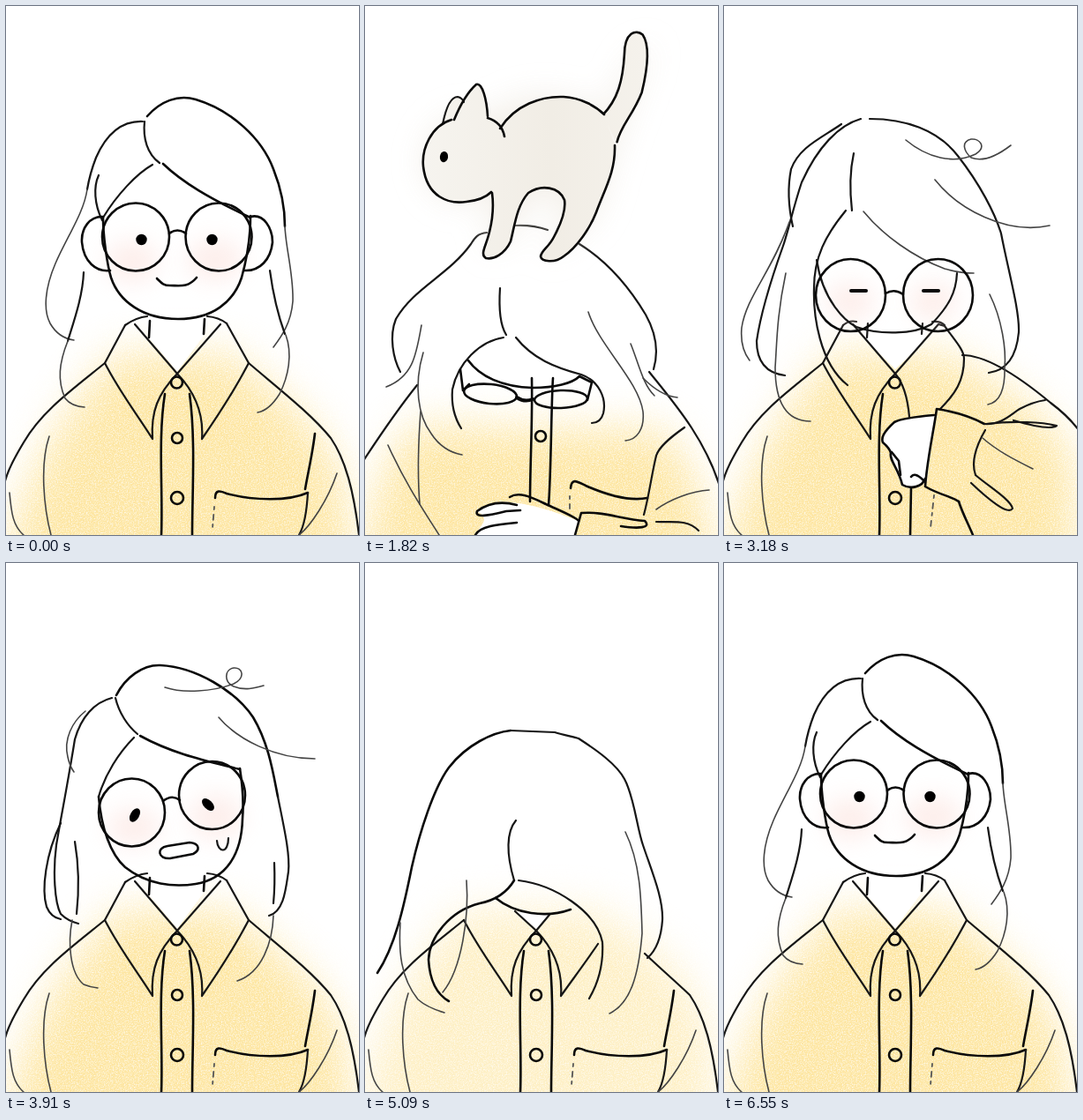
An HTML page that plays this animation: 400x600 px, repeating every 7.36 s.

```html
<!DOCTYPE html>
<html lang="en">
<head>
<meta charset="utf-8">
<title>Cat on the head</title>
<style>
html, body { margin: 0; width: 100%; height: 100%; overflow: hidden; background: #fff; }
svg { display: block; width: 400px; height: 600px; }
path { fill: none; stroke: #0a0a0a; stroke-linecap: round; stroke-linejoin: round; }
.b { stroke-width: 2.6; }
.m { stroke-width: 2.2; stroke: #161616; }
.t { stroke-width: 1.6; stroke: #444; }
.h { stroke-width: 4; }
.f { fill: #000; stroke: none; }
.w { fill: #fff; stroke: none; }
.dash { stroke-width: 1.8; stroke: #555; stroke-dasharray: 3 6 6 5; }
.tint, .pale { fill: #fde293; stroke: none; filter: url(#grain); opacity: .88; }
.pale { opacity: .55; }
.blush { fill: #fbd9d2; stroke: none; opacity: .42; filter: url(#soft); }
.fur { fill: url(#coat); stroke: none; }
.glow { fill: #f1ece4; stroke: none; filter: url(#wide); opacity: .85; }
</style>
</head>
<body>
<svg viewBox="0 0 400 600" id="stage">
  <defs>
    <filter id="grain" filterUnits="userSpaceOnUse" x="0" y="0" width="400" height="600" color-interpolation-filters="sRGB">
      <feGaussianBlur in="SourceGraphic" stdDeviation="24" result="soft"/>
      <feTurbulence type="fractalNoise" baseFrequency=".7" numOctaves="2" seed="4"/>
      <feColorMatrix values="0 0 0 0 0  0 0 0 0 0  0 0 0 0 0  1.7 0 0 0 -.02" result="dots"/>
      <feComposite in="soft" in2="dots" operator="in"/>
    </filter>
    <filter id="soft" x="-60%" y="-60%" width="220%" height="220%"><feGaussianBlur stdDeviation="13"/></filter>
    <filter id="wide" x="-40%" y="-40%" width="180%" height="180%"><feGaussianBlur stdDeviation="18"/></filter>
    <linearGradient id="coat" gradientUnits="userSpaceOnUse" x1="66" y1="0" x2="330" y2="0">
      <stop offset="0" stop-color="#f6f4ef"/><stop offset=".55" stop-color="#f1ede5"/><stop offset="1" stop-color="#f5f2ec"/>
    </linearGradient>
  </defs>
  <g id="body"></g>
  <g id="head"></g>
  <g id="cat">
    <path class="glow" d="M101,115C60,130 50,200 110,210L143,200L140,270L170,240Q195,180 226,210L205,275L262,222L284,143L326,30L305,45L271,111Q200,70 139,113Z"/>
    <g id="tail">
      <path class="fur" d="M271,111C290,95 298,75 303,45C306,20 319,18 326,25C333,38 327,65 318,90C305,115 290,125 284,145Z"/>
      <path class="b" d="M271,111C290,95 298,75 303,45C306,20 319,18 326,25C333,38 327,65 318,90C305,115 290,125 284,143"/>
    </g>
    <path class="fur" d="M88,122C92,102 98,91 105,91L112,97Q118,84 126,77C133,74 138,95 139,113L153,127C170,100 200,90 225,91C245,92 262,102 271,111L283,146C284,175 272,195 262,222C255,240 240,262 225,272C215,280 200,278 199,272C200,265 208,262 214,250C222,235 228,220 226,208C220,193 200,190 185,200C172,215 170,235 165,255C158,270 145,276 137,274C130,270 137,260 140,248C145,230 146,215 144,200C138,204 130,208 115,210C95,213 70,205 66,170C64,150 75,122 88,122Z"/>
    <path class="m" d="M88,122C92,102 98,91 105,91Q110,92 112,97"/>
    <path class="b" d="M98,117C75,124 64,150 66,170C70,205 95,213 115,210Q134,208 143,199M101,117C108,100 117,85 126,77C133,74 138,95 139,113M139,115C149,118 156,125 158,136M153,127C170,100 200,90 225,91C245,92 262,102 271,111"/>
    <path class="b" d="M283,146C284,175 272,195 262,222C255,240 240,262 225,272C215,280 200,278 199,272C200,265 208,262 214,250C222,235 228,220 226,208C220,193 200,190 185,200C172,215 170,235 165,255C158,270 145,276 137,274C130,270 137,260 140,248C145,230 146,215 144,200"/>
    <ellipse cx="89.500" cy="159" rx="4.600" ry="6.200" transform="rotate(8 89 159)"/>
  </g>
</svg>
<script>
const $ = id => document.getElementById(id);
const NS = 'http://www.w3.org/2000/svg';

// "O x y rx ry angle" is shorthand for an ellipse.
function oval(x, y, rx, ry = rx, a = 0) {
  const c = rx * Math.cos(a * Math.PI / 180), s = rx * Math.sin(a * Math.PI / 180);
  return `M${x - c},${y - s}a${rx},${ry} ${a} 1 1 ${2 * c},${2 * s}a${rx},${ry} ${a} 1 1 ${-2 * c},${-2 * s}`;
}

// Each line: name, line class, path. A lone "-" removes an inherited stroke.
function pose(text, base = {}) {
  const out = { ...base };
  for (const line of text.trim().split('\n')) {
    const [name, cls, ...rest] = line.trim().split(' ');
    if (cls === '-') { delete out[name]; continue; }
    const d = rest[0] === 'O' ? oval(...rest.slice(1).map(Number)) : rest.join(' ');
    out[name] = { cls, d };
  }
  return out;
}

const front = pose(`
tint tint M125,395L255,395C290,430 355,465 380,530L402,660L-5,660C10,545 60,465 125,395Z
neck w M163,345L225,345L224,374L194,415L162,376Z
neckL b M163,357L162,376
neckR b M225,355L224,372
backL m M160,352Q148,353 135,362
backR m M228,352Q241,353 250,360
colL m M135,362L112,405C130,440 150,465 166,491C164,460 172,440 194,417L146,361
colR m M250,360L275,405C262,430 240,465 222,491C224,465 216,440 194,417L243,361
placL b M180,440C172,490 178,550 176,600
placR b M208,440C215,490 211,550 211,600
btn1 b O 193.5 427 6.5
btn2 b O 194 490 6
btn3 b O 194 558 7
shL m M112,405C75,435 40,460 20,495C5,520 0,532 -4,550
shR m M275,405C310,435 345,462 368,490C385,515 394,550 400,600
armL t M49,488C38,520 43,570 51,600
cuffL t M4,552C6,575 8,590 20,600
pocket b M237,558C237,548 243,550 250,553C280,561 320,562 342,552
pside m M342,552C341,570 338,590 332,600
stitch dash M236,568L234,592
armR b M350,485C347,510 342,530 339,548
foldR t M375,530C365,560 345,590 332,600`);

const bodies = {
A: front,
B: pose(`
tint tint M55,475L245,480L335,480C365,510 385,540 402,660L-5,660C5,550 20,520 55,475Z
placL b M189,422C190,470 187,520 187,562
placR b M213,422C211,450 211,530 208,566
btn2 b O 199 488 6
shL m M59,430C35,460 15,490 -2,516
shR m M322,415C350,450 385,490 402,545
armL t M63,460C60,500 60,540 62,565
cuffL t M26,498C45,540 65,570 84,600
pocket b M233,547C234,535 240,539 250,544C275,555 300,562 320,558
stitch dash M232,556L232,570
armR m M362,478C345,490 333,500 330,510C325,530 322,555 316,577
foldR t M390,549C370,550 345,560 330,571
palm w M125,602C127,590 145,583 127,573C140,560 170,555 242,584L238,602Z
fing1 b M125,600C130,590 150,588 172,586
fing2 b M172,566C150,560 135,567 127,573C124,581 140,578 160,573L176,572
hand b M164,557C175,550 190,558 205,565C220,572 240,580 242,584
cuff b M238,600L245,575C270,573 290,582 317,584C325,592 310,593 290,590
wrist m M330,585C350,586 365,582 378,595`),
C: pose(`
tint tint M80,440L120,420L205,430L225,505L315,510L360,515L402,660L-5,660C10,540 30,500 80,440Z
neckL m M181,388C190,398 198,402 207,406
neckR m M248,392Q245,402 236,407
backL m M214,411L228,410
colL m M207,413C190,430 175,450 163,466
colR m M232,409C245,435 255,455 270,475
placL b M208,413C202,460 197,510 199,573
placR b M234,412C227,470 227,530 228,583
btn1 b O 221 426 6
btn2 b O 212 510 6
shL m M95,396C65,420 50,445 35,465C15,485 5,500 -2,515
shR m M300,403C330,430 360,455 375,485C390,510 395,530 402,545
armL m M64,445C50,490 38,530 48,565Q54,588 69,600
cuffL t M38,502C32,530 40,560 45,570
pocket m M236,548C238,538 245,540 255,543C280,552 305,556 320,549
stitch dash M237,554L237,576
armR m M349,478C335,490 328,510 325,530C322,555 318,570 317,580
foldR t M390,533C360,538 340,550 320,577
palm w M120,602C125,580 145,572 165,574C190,574 215,578 238,582L238,602Z
hand b M120,600C125,580 145,574 165,574C190,574 215,578 236,582
fing1 b M155,592Q143,592 132,600
cuff m M238,600L240,581C255,582 270,585 282,586L284,600
wrist m M282,585C300,583 320,575 345,574C365,574 375,578 383,585`),
D: pose(`
tint tint M125,395L255,395C300,425 365,455 395,510L402,660L-5,660C10,545 60,465 125,395Z
neck w M150,345L235,345L228,380L194,412L160,378Z
neckL m M163,360L162,376
neckR m M225,360L224,372
backL m M150,358Q142,356 135,362
backR m M236,358Q245,357 250,362
colR m M194,417L243,361L250,363C262,380 272,390 272,400C272,425 262,440 245,457
colR2 m M194,417Q207,432 210,466
placR b M212,546L211,600
btn2 -
pside -
pocket -
armR -
foldR -
stitch dash M238,555L234,592
shR m M270,396C300,396 340,425 370,450Q390,465 402,481
palm w M240,463C215,466 200,468 193,472C180,484 178,490 180,495L189,507C190,518 196,530 202,545C212,547 225,545 230,538Z
hand b M238,464C215,466 200,468 193,472C180,484 178,490 180,495Q188,502 189,507C187,515 198,525 202,543C212,549 225,545 228,536
fing1 b M190,506L198,516L200,532M212,534Q216,528 226,538
cuff b M295,474C280,466 260,460 241,457C238,480 230,515 228,545C245,555 258,556 266,562
elbow b M266,562C270,575 278,590 282,600
cuffR m M296,481C285,500 280,518 285,532
wrist m M295,474C315,475 325,463 335,457Q350,449 364,447
fold1 m M297,474C330,470 360,472 377,476C370,481 345,475 328,470
fold2 t M293,490C310,505 330,515 350,525
fold3 m M285,532C300,545 325,560 327,570C322,578 300,560 280,541`, front),
E: front,
F: pose(`
tint pale M110,395L265,395C320,435 370,460 390,530L402,660L-5,660C0,540 45,470 110,395Z
neck w M170,395L209,399L194,415Z
neckL m M170,395L194,417L209,399
neckR -
backL -
backR -
colL m M112,405C130,440 150,465 166,491C164,460 172,440 194,417
colR m M264,432C252,450 237,470 222,491C224,465 216,440 194,417
shR m M317,443C335,460 352,475 368,490C385,515 394,550 400,600`, front)
};

const smile = pose(`
blush blush O 143 290 30 24
blush2 blush O 237 288 32 24
hairR b M160,125C175,108 195,100 215,106C255,118 290,150 303,185C313,210 316,232 316,250
tipR t M316,250C317,275 326,305 325,335C323,360 312,375 303,387
hairL m M155,131C130,130 113,147 102,172Q95,190 92,208
tipL t M92,208C88,235 70,260 56,292C44,320 42,345 50,360C58,374 70,378 77,379
part m M157,131C155,150 160,168 174,178
bangR b M178,179C200,200 230,218 277,240
bangL m M166,180C148,190 125,215 110,240
wisp m M105,192C99,205 100,225 109,243
earL b M110,239C95,238 85,252 86,268C88,290 102,302 118,300
earR b M277,239C292,235 302,252 302,268C300,287 288,301 270,300
chin b M110,240C110,262 115,295 119,308C128,335 155,355 195,355C235,355 258,335 267,308C272,290 277,262 277,238
lensL b O 147 262 38 38.5
lensR b O 241 262 37.5 38.5
bridge b M185,258Q194,251 204,258
eyeL f O 153.5 265 6.2
eyeR f O 233.5 265 6.2
mouth b M171,309C176,314 178,317 186,317C196,317 206,320 216,308
lockL m M88,302C87,330 76,360 70,380
endL t M70,380C60,405 58,425 67,445Q74,454 89,455
lockR m M299,300C303,330 308,350 316,372
endR t M317,373C325,395 320,420 310,440Q298,459 285,461`);

const shut = pose(`
eyeL b M146,264Q153,270 161,264
eyeR b M226,264Q233,270 241,264`, smile);
const flat = 'mouth b M183,314Q194,311 205,314';

const heads = {
A: smile,
shut,
calm: pose(flat, smile),
grin: pose('mouth b M177,311Q194,321 210,311', smile),
nap: pose(flat, shut),
B: pose(`
hairL m M138,247C128,248 125,252 120,260C95,295 55,310 35,345C27,365 32,390 40,405
crown m M170,239Q190,238 207,244
hairR m M243,260C275,280 300,310 318,340C332,365 332,385 327,402
tipL t M64,352C58,385 55,410 24,422
endL t M66,383C55,420 60,455 75,475Q88,495 110,499
part m M153,310C151,340 155,355 160,363
bangL m M157,366C130,370 105,395 99,425Q97,450 109,469
bangR m M171,366C190,390 215,400 245,408C265,415 274,435 270,452Q267,463 257,463
endR t M253,337C265,375 310,415 315,450C317,470 308,482 295,483
lockR t M301,373C310,395 315,420 328,432
tipR t M315,412C330,427 342,433 354,434
chin b M117,392C130,410 155,422 190,423C215,423 235,418 243,410
lensL b O 142 430 30 11 6
lensR b O 222 436 30 10 -2
bridge h M172,434Q181,440 190,436
frameL b M118,419L111,426L108,402
frameR b M243,410L257,417L252,437`),
C: pose(`
hairL m M219,125C195,125 165,140 145,160C125,180 118,210 105,235C90,270 70,310 72,345Q75,369 89,372
outL t M200,127C165,128 140,135 132,146Q125,156 123,180
tipL t M104,235C80,290 62,340 60,374
hairR m M232,127C260,130 300,150 320,180C340,215 335,250 350,285C365,315 375,345 372,360Q369,377 353,384
tipR t M341,317C338,360 345,410 367,444
part m M221,138C212,160 208,175 208,191
bangL m M201,195C180,205 160,245 142,286C132,330 135,380 137,410C142,435 155,455 163,466
wisp t M124,377C125,420 135,445 162,466
lockL m M115,235C100,300 98,360 97,405Q99,437 119,452
bangR t M220,193C245,210 265,235 280,260C292,285 293,320 291,350C283,400 265,440 235,468
lockR m M303,405C300,440 285,465 270,475
endR t M325,375C325,420 318,465 298,482Q290,490 282,490
curl t M244,152C260,175 290,180 315,172C335,165 335,150 320,150C308,150 305,165 318,172C330,178 345,175 355,166
stray t M265,188C290,220 330,235 373,229
chin m M137,345C150,375 180,397 215,398C250,396 275,380 288,362
lensL b M170,219C203,217 218,245 212,276C205,302 165,312 143,288
lensR b M292,293C275,278 240,278 224,300C213,325 222,358 250,363Q276,363 292,348
bridge h M210,285C220,281 226,290 224,299
eyeL h M173,251L191,270M190,254L174,268
eyeR b M248,276L263,290M255,273L262,281M245,281L262,280M266,288L268,289
mouth b M196,367C185,367 180,357 187,349C193,341 206,341 208,352C217,349 219,362 214,368`),
D: pose(`
blush blush O 143 335 27 22
blush2 blush O 237 335 27 22
hairL m M155,128C130,135 106,160 88,200C78,230 73,255 67,272C57,300 42,345 37,380Q37,415 69,419
outL m M133,134C110,150 85,160 76,185Q70,215 78,250
tipL t M74,245C55,300 25,330 20,365Q18,388 29,402
hairR m M165,128C205,128 242,140 265,170C290,202 307,235 314,258C322,300 335,345 334,370Q330,412 300,416
part m M147,167C142,190 143,215 145,232
bangL m M138,232C115,260 102,285 102,320C101,350 108,405 140,430
bangR t M158,233C180,260 215,285 250,298Q268,303 283,303
endL t M70,303C60,350 60,380 58,410C58,440 65,471 98,471
endR t M301,327C315,355 320,390 318,410Q319,448 299,452
curl t M206,152C230,172 260,180 285,168C298,160 290,150 280,151C268,154 272,165 280,172C295,178 312,168 325,158
stray t M239,197C265,230 320,260 369,249
chin m M105,288C112,335 138,358 150,364C175,373 215,373 235,361C255,340 263,325 264,303
lensL b O 143.5 328 39.5 41
lensR b O 242.5 328 39.5 41
bridge b M183,326Q193,320 203,327
eyeL h M144,323L161,323
eyeR h M226,323L243,323`),
E: pose(`
blush blush O 145 300 30 22
blush2 blush O 238 288 30 26
hairR b M125,150C135,130 155,115 175,116C215,118 260,145 280,175C298,205 303,240 308,265
tipR m M308,265C315,300 322,330 320,350C317,370 315,395 298,400
hairL m M120,153C100,158 85,175 78,200C70,250 62,290 57,320C53,350 55,385 62,398Q70,406 82,409
outL t M90,168C75,180 65,200 70,220Q72,230 77,237
tipL m M62,295C45,330 40,370 46,390Q51,402 62,404
part m M124,153C128,170 138,185 149,194
bangR b M152,196C190,217 230,225 265,234
bangL m M145,198C128,215 112,240 105,265
lockL m M78,316C83,345 83,370 80,398
endL t M75,405C70,430 72,465 88,478Q95,481 104,482
lockR m M304,340Q305,365 303,386
endR t M303,400C302,430 290,465 262,474
curl t M180,141C200,148 235,146 258,137C272,130 268,118 258,119C247,121 247,135 258,140C270,145 282,142 292,139
stray t M241,175C262,200 305,222 350,222
chin b M105,265C108,300 118,330 135,345C160,365 190,368 215,364C250,358 267,330 268,290Q270,265 265,233
lensL b O 142.5 283 37.5 38.5
lensR b O 233.5 263.5 37.5 38.5
bridge b M178,270Q188,262 197,269
eyeL f O 146 286 5 8.5 30
eyeR f O 229 274 5 8.5 -45
mouth b M183,321L208,317C220,318 220,326 212,330L186,335C172,336 170,323 183,321
sweat m M239,315C240,329 252,330 252,312`),
F: pose(`
hairL b M14,465C34,435 44,390 53,345C62,305 78,255 95,232C115,206 145,192 165,190
hairR m M165,190L215,192C225,195 235,197 242,199C262,212 285,228 294,245C305,265 308,300 315,320C325,350 338,380 337,405Q335,435 320,448
part m M171,292C160,305 160,330 169,360
bangL b M169,360C160,375 145,383 130,386C95,395 73,425 72,450Q74,485 95,497
lockL t M115,360C118,400 110,460 88,487
endL t M40,408C38,440 40,470 60,495Q70,504 90,510
bangR m M174,360C215,365 262,395 269,430Q271,465 254,494
endR t M295,305C312,340 313,380 314,420C310,470 300,500 277,511
chin b M148,380C170,398 205,403 233,393`)
};

// Sample a path so that any two strokes can be blended.
const N = 44, cache = new Map(), probe = document.createElementNS(NS, 'path');
function points(d) {
  if (!cache.has(d)) {
    probe.setAttribute('d', d);
    const len = probe.getTotalLength(), list = [];
    for (let i = 0; i <= N; i++) {
      const p = probe.getPointAtLength(len * i / N);
      list.push([p.x, p.y]);
    }
    cache.set(d, list);
  }
  return cache.get(d);
}
const mix = (a, b, u) => a + (b - a) * u;
const single = d => d.lastIndexOf('M') === 0;

function blend(p, q, u) {
  if (p.d === q.d || u === 0) return p.d;
  if (!single(p.d) || !single(q.d)) return (u < .5 ? p : q).d;
  const b = points(q.d);
  return 'M' + points(p.d).map(([x, y], i) =>
    mix(x, b[i][0], u).toFixed(1) + ',' + mix(y, b[i][1], u).toFixed(1)).join('L');
}

function layer(group, poses) {
  const els = {};
  for (const set of Object.values(poses))
    for (const name in set)
      els[name] = els[name] || group.appendChild(document.createElementNS(NS, 'path'));
  return (from, to, u) => {
    const P = poses[from] || poses.A, Q = poses[to] || poses.A;
    for (const name in els) {
      const near = (u < .5 ? P : Q)[name], el = els[name];
      el.style.display = near ? '' : 'none';
      if (!near) continue;
      el.setAttribute('class', near.cls);
      el.setAttribute('d', P[name] && Q[name] ? blend(P[name], Q[name], u) : near.d);
    }
  };
}
const drawBody = layer($('body'), bodies), drawHead = layer($('head'), heads);

// step, pose, head x, head y, head angle
const keys = [
  [0, 'A', 0, 0, 0], [3, 'A', 0, 3, -1], [6, 'A', 0, -4, 1], [8, 'A', 0, 2, 0],
  [10, 'B', 0, 14, 0], [12, 'B', 0, -5, 0], [14, 'B', 0, 0, 0], [16, 'B', 0, 3, 0], [18, 'B', 0, 0, 0],
  [20, 'B', 0, 10, 0], [23, 'C', 4, -4, 4], [26, 'C', 0, 0, 0], [29, 'C', -4, 3, -4],
  [33, 'D', 0, 3, 0], [35, 'D', 0, 0, 0], [37, 'D', 0, 3, 0],
  [41, 'E', 0, -4, -2], [43, 'E', 0, 0, 0], [45, 'E', 0, 0, 0],
  [47, 'E', -3, 0, -6], [49, 'E', 3, 0, 6], [51, 'E', -3, 0, -6], [53, 'E', 2, 0, 4],
  [56, 'F', 0, 0, 0], [58, 'F', 0, 5, 0], [61, 'A', 0, -22, 0], [62, 'A', 0, 3, 0],
  [63, 'nap', 0, 0, 0], [64, 'calm', 0, 0, 0], [66, 'calm', 0, 0, 0], [67, 'grin', 0, 0, 0],
  [69, 'grin', 0, 0, 0], [70, 'nap', 0, 0, 0], [71, 'shut', 0, 0, 0], [72, 'A', 0, 0, 0], [99, 'A', 0, 0, 0]
];
const catKeys = [[5, -330], [7, -190], [9, 0], [10, 14], [12, -5], [14, 0], [16, 3], [18, 0], [20, 12], [21, -50], [24, -330]];

function span(list, k) {
  let i = 0;
  while (i < list.length - 2 && list[i + 1][0] <= k) i++;
  const a = list[i], b = list[i + 1];
  return [a, b, Math.min(1, Math.max(0, (k - a[0]) / (b[0] - a[0])))];
}

function render(k) {
  const [a, b, v] = span(keys, k), u = v * v * (3 - 2 * v);
  drawBody(a[1], b[1], u);
  drawHead(a[1], b[1], u);
  const [x, y, r] = [2, 3, 4].map(i => mix(a[i], b[i], u));
  $('head').setAttribute('transform', `translate(${x} ${y}) rotate(${r} 194 370)`);

  const [c, d, w] = span(catKeys, k);
  $('cat').style.display = k >= 5 && k < 24 ? '' : 'none';
  $('cat').setAttribute('transform', `translate(0 ${mix(c[1], d[1], w)})`);
  $('tail').setAttribute('transform', `rotate(${8 * Math.sin((k - 14) * .9)} 278 128)`);
}

// Eleven drawings a second, on a 10 ms grid; the last one holds.
const LOOP = 7360, start = k => Math.round(k * 100 / 11) * 10;
let shown = -1;
const t0 = performance.now();
function tick() {
  const t = (performance.now() - t0) % LOOP;
  let k = Math.floor((t + 5) * 11 / 1000);
  if (start(k) > t) k--;
  k = Math.min(72, Math.max(0, k));
  if (k !== shown) render(shown = k);
  requestAnimationFrame(tick);
}
tick();
</script>
</body>
</html>
```
